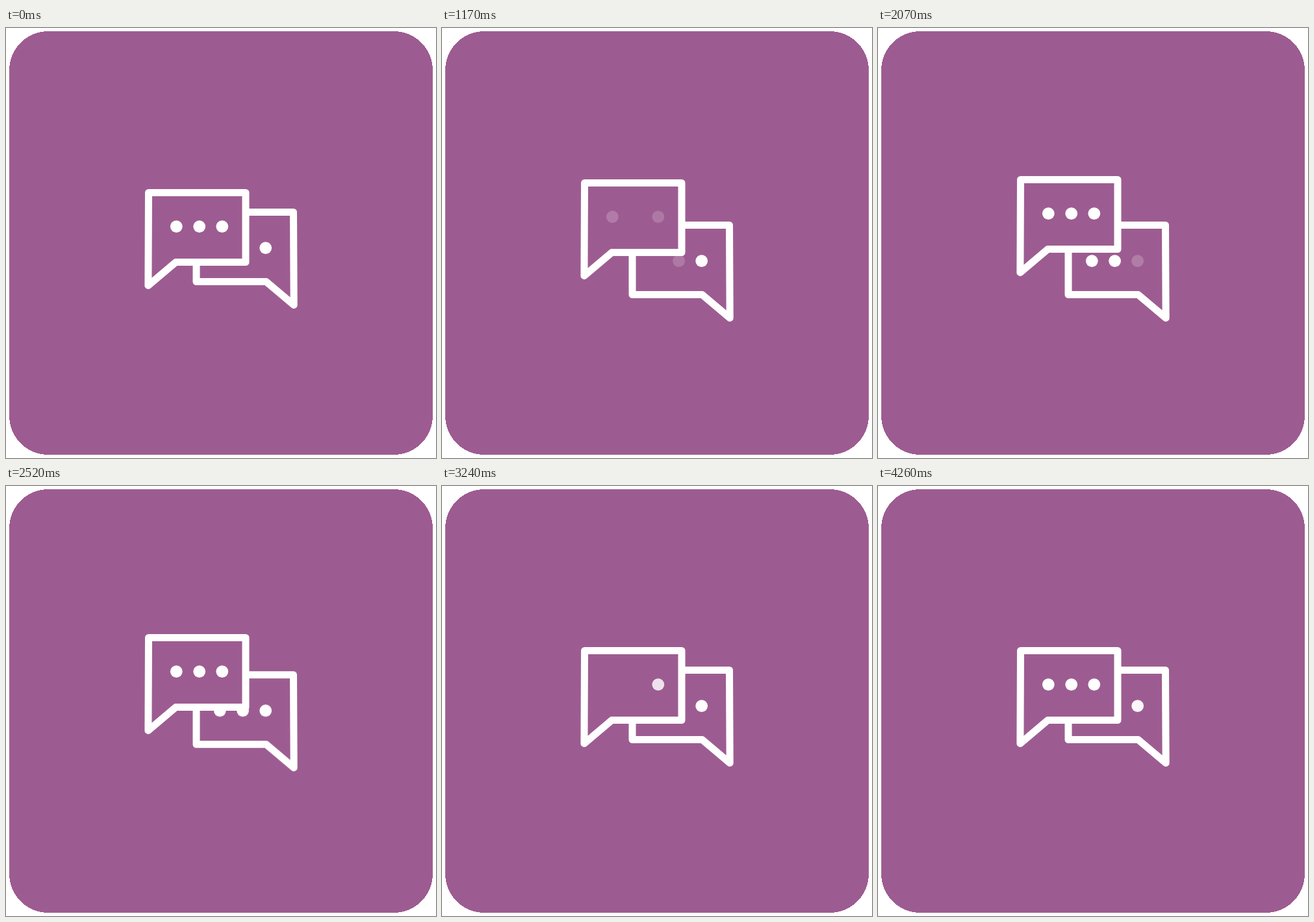
Write an HTML page that moves like this. It is 662 by 662 pixels and loops after 4500 ms.

```html
<!DOCTYPE html>
<html lang="en">
<head>
<meta charset="utf-8">
<title>Chat bubbles</title>
<style>
  html, body { margin: 0; width: 100%; height: 100%; overflow: hidden; background: #fff; }
  svg { display: block; width: 100%; height: 100%; }

  .card, .bubble path { fill: #9d5c91; }
  .bubble path { stroke: #fff; stroke-width: 11; stroke-linejoin: round; }
  .bubble circle { fill: #fff; animation: 4.5s linear infinite; }

  .bubble { animation: 4.5s cubic-bezier(.333, 0, .667, 1) infinite; }
  .back { animation-name: sink; }
  .front { animation-name: rise; }

  .front .left { animation-name: front-left; }
  .front .mid { animation-name: front-mid; }
  .front .right { animation-name: front-right; }
  .back .left { animation-name: back-left; }
  .back .mid { animation-name: back-mid; }
  .back .right { animation-name: back-right; }

  @keyframes sink {
    0%, 4.333%, 60.889%, 100% { transform: translateY(0); }
    20%, 48.889% { transform: translateY(20px); }
  }
  @keyframes rise {
    0%, 15.556%, 72%, 100% { transform: translateY(0); }
    31.111%, 62.222% { transform: translateY(-20px); }
  }

  @keyframes front-left {
    0%, 10%, 29.222%, 58.667%, 77.933%, 100% { opacity: 1; }
    14%, 25.222%, 62.667%, 73.933% { opacity: 0; }
  }
  @keyframes front-mid {
    0%, 16.667%, 35.889%, 65%, 84.6%, 100% { opacity: 1; }
    20.667%, 31.889%, 69%, 80.6% { opacity: 0; }
  }
  @keyframes front-right {
    0%, 22.733%, 42.556%, 71.333%, 91.333%, 100% { opacity: 1; }
    26.733%, 38.556%, 75.333%, 87.333% { opacity: 0; }
  }
  @keyframes back-left {
    0%, 16.667%, 35.889%, 100% { opacity: 1; }
    20.667%, 31.889% { opacity: 0; }
  }
  @keyframes back-mid {
    0%, 22.733%, 42.556%, 100% { opacity: 1; }
    26.733%, 38.556% { opacity: 0; }
  }
  @keyframes back-right {
    0%, 28.667%, 49.222%, 75.556% { opacity: 1; }
    32.667%, 45.222%, 79.556%, 91% { opacity: 0; }
    94.667%, 100% { opacity: .95; }
  }
</style>
</head>
<body>
<svg viewBox="0 0 662 662">
  <rect class="card" x="5" y="5" width="652" height="652" rx="60" shape-rendering="crispEdges"/>
  <g class="bubble back">
    <path d="M293 283.5H442.5L443.2 426.5L400.5 390.5H293Z"/>
    <circle class="left" cx="329.3" cy="338.6" r="9.4"/>
    <circle class="mid" cx="364.6" cy="338.6" r="9.4"/>
    <circle class="right" cx="399.7" cy="338.6" r="9.4"/>
  </g>
  <g class="bubble front">
    <path d="M219.5 253.5H369V360.5H261.5L218.9 396.5Z"/>
    <circle class="left" cx="262.3" cy="305.6" r="9.4"/>
    <circle class="mid" cx="297.7" cy="305.6" r="9.4"/>
    <circle class="right" cx="332.8" cy="305.6" r="9.4"/>
  </g>
</svg>
</body>
</html>
```
